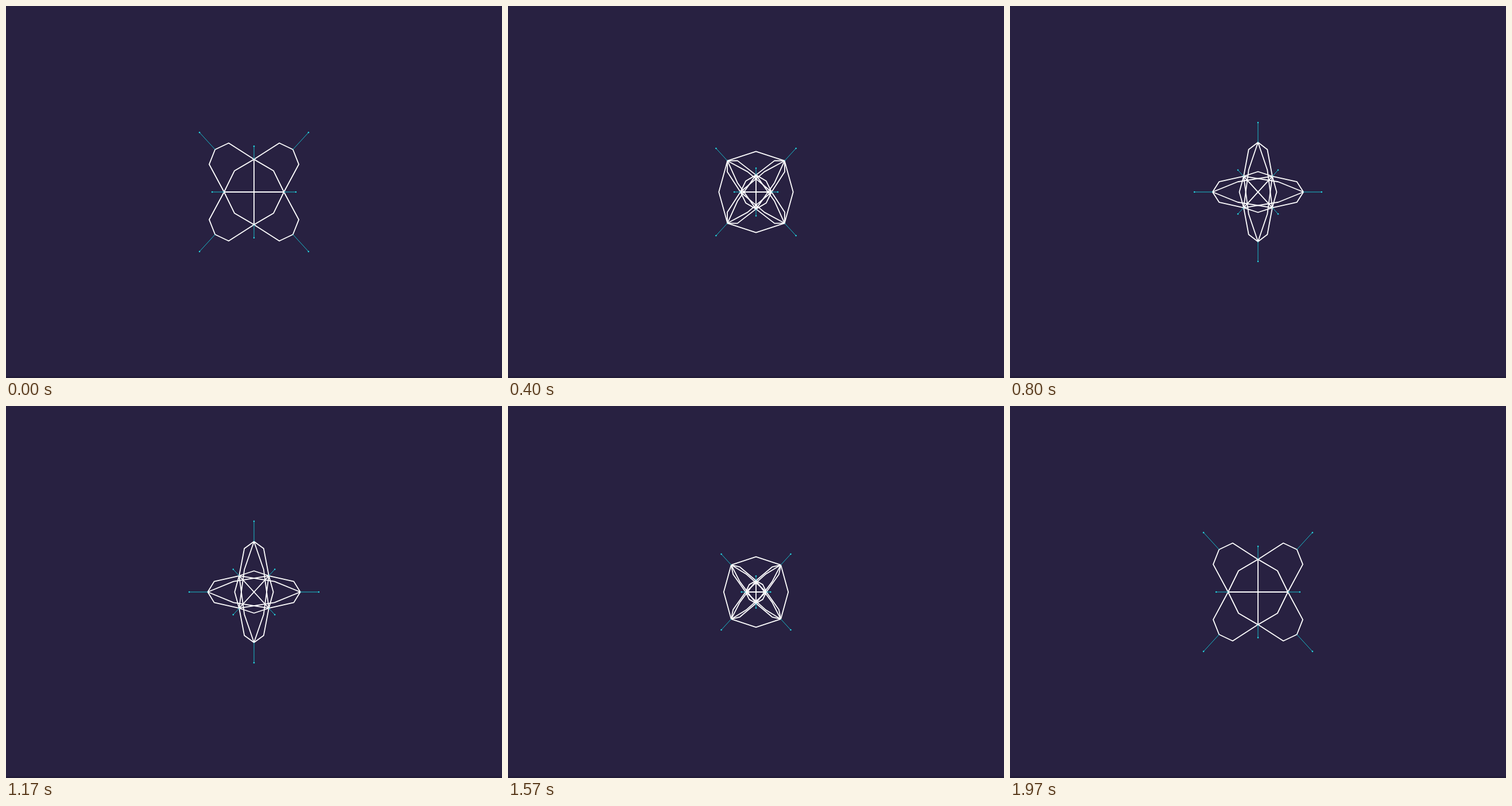
An HTML page with a canvas that plays this animation: 864x648 px, repeating every 2010 ms.

```html
<!DOCTYPE html>
<html lang="en">
<head>
<meta charset="utf-8">
<title>Wireframe star</title>
<style>
  html, body { margin: 0; width: 100%; height: 100%; overflow: hidden; background: #282141; }
  canvas { display: block; width: 864px; height: 648px; }
</style>
</head>
<body>
<canvas id="stage" width="864" height="648"></canvas>
<script>
const ctx = document.getElementById('stage').getContext('2d');
const LOOP = 2010, STEP = 1000 / 30, LAST = 59;
const CX = 432, CY = 324, STRETCH = 1.092;
const BEVEL = 0.651, REACH = 1.4;

const add = (a, b, s = 1) => [a[0] + b[0] * s, a[1] + b[1] * s];
const mul = (a, s) => [a[0] * s, a[1] * s];
const dot = (a, b) => a[0] * b[0] + a[1] * b[1];
const place = ([x, y]) => [CX + x, CY + y * STRETCH];

function line(...points) {
  ctx.beginPath();
  points.forEach(p => ctx.lineTo(...place(p)));
  ctx.stroke();
}

// Eight-sided ring spanned by two axes; wide corners are optional.
function ring(a, b, wide = true) {
  for (const s of [1, -1]) for (const t of [1, -1]) {
    const u = mul(a, s), v = mul(b, t);
    if (wide || dot(u, v) > 0) line(u, mul(add(u, v), BEVEL), v);
  }
}

function spoke(a) {
  const tip = mul(a, REACH), [x, y] = place(tip);
  line(a, tip);
  ctx.beginPath();
  ctx.arc(x, y, 1.25, 0, Math.PI * 2);
  ctx.fill();
}

// Sizes of the straight and diagonal axes, easing away from each rest pose.
function pose(time) {
  const half = LOOP / 2;
  const fromEnd = Math.min(time, LOOP - time);
  const first = fromEnd < half / 2 + 2.5;
  const away = first ? fromEnd : half - fromEnd;
  const p = Math.min(1, (away / 511) ** 3);
  return first
    ? { first, p, c: 52.1 * (1 - p), d: 67.8 - 37.7 * p }
    : { first, p, c: 82 - 44 * p, d: 26.7 * (1 - p) };
}

// The loop rests at both ends and at its middle.
function timeline(time) {
  const fromEnd = Math.min(time, LOOP - time);
  const first = fromEnd < 505;
  const away = first ? fromEnd : LOOP / 2 - fromEnd;
  const p = Math.min(1, (away / 511) ** 3);
  return first
    ? { first, p, c: 52.1 * (1 - p), d: 67.8 - 37.7 * p }
    : { first, p, c: 82 - 44 * p, d: 26.7 * (1 - p) };
}

function draw(time) {
  const { first, p, c, d } = timeline(time);
  const straight = [[c, 0], [0, c]];
  const diagonal = [[d, d], [d, -d]];
  const [inner, outer] = first ? [straight, diagonal] : [diagonal, straight];

  ctx.fillStyle = '#282141';
  ctx.fillRect(0, 0, 864, 648);
  ctx.fillStyle = '#211b38';
  ctx.fillRect(0, 645, 864, 3);

  ctx.lineJoin = ctx.lineCap = 'round';
  ctx.lineWidth = 1.8;
  ctx.strokeStyle = '#fff';
  ring(...inner);
  if (p > 0.085) ring(...outer);
  for (const a of straight) for (const b of diagonal) ring(a, b, !first || p > 0.2);
  for (const a of inner) line(a, mul(a, -1));

  ctx.lineWidth = 1;
  ctx.strokeStyle = '#18bccb';
  ctx.fillStyle = '#25dbe6';
  for (const a of [...straight, ...diagonal]) {
    spoke(a);
    spoke(mul(a, -1));
  }
}

const start = performance.now();
function tick() {
  const t = (performance.now() - start) % LOOP;
  draw(Math.min(LAST, Math.floor((t + 4) / STEP)) * STEP);
  requestAnimationFrame(tick);
}
tick();
</script>
</body>
</html>
```
